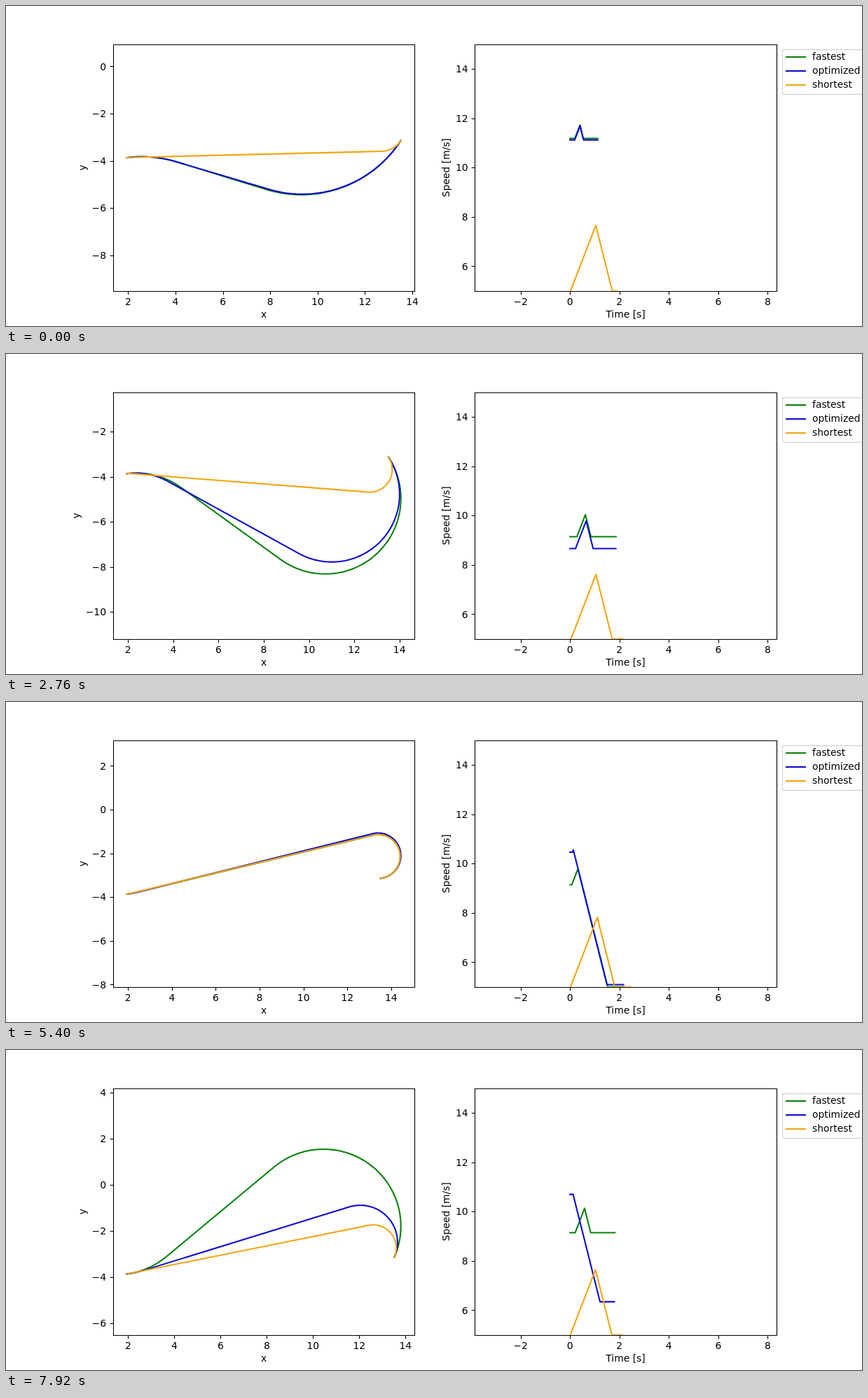
Animation, 1222 px wide and 458 px high, one loop 8 s. Source, as an HTML page:

```html
<!DOCTYPE html>
<html lang="en">
<head>
<meta charset="utf-8">
<title>Path planning</title>
<style>
html, body { margin: 0; width: 1222px; height: 458px; overflow: hidden; background: #fff; }
svg { display: block; }
text { font: 13.89px "DejaVu Sans", sans-serif; fill: #000; }
.axis { fill: none; stroke: #000; stroke-width: 1.11; }
.curve { fill: none; stroke-width: 2.08; stroke-linejoin: round; stroke-linecap: square; }
</style>
</head>
<body>
<svg id="stage" width="1222" height="458" viewBox="0 0 1222 458">
  <defs>
    <clipPath id="leftClip"><rect x="152.75" y="54.96" width="430.5" height="352.66"/></clipPath>
    <clipPath id="rightClip"><rect x="669.3" y="54.96" width="430.5" height="352.66"/></clipPath>
  </defs>
  <g id="plot"></g>
  <g id="fixed"></g>
</svg>
<script>
const STEP = 120, LOOP = 8000, LAST = 66;
const FONT = 13.89;
const TOP = 54.96, HEIGHT = 352.66, BOTTOM = TOP + HEIGHT, WIDTH = 430.5;
const LEFT = 152.75, RIGHT = 669.3;
const TIME_ZERO = 805.2, UNIT = 35.266;
const COLORS = { fastest: "#068206", optimized: "#0a0ad6", shortest: "#f4a40e" };

// Vehicle limits
const LATERAL = 25, ACCEL = 2.6, BRAKE = 4;
const START = { x: 1.94, y: -3.868, h: 0.13 };
const GOAL = { x: 13.517, y: -3.139 };
const GRID = [5, 5 * 5 ** 0.375, 5 * 5 ** 0.5];

// Rows: step, speeds
const WIDE = [[0, 11.12], [10, 10.1], [23, 8.66], [32, 7.7]];
const TIGHT = [[23, 9.7, 5], [32, 10.03, 5.02], [39, 10.35, 5.03], [51, 10.57, 5.15], [66, 10.7, 6.34]];

const TAU = 2 * Math.PI;
const turn = a => ((a % TAU) + TAU) % TAU;
const snap = v => Math.floor(v + 0.5) + 0.5;
const label = n => String(n).replace("-", "\u2212");
const labelWidth = n => [...label(n)].reduce((w, c) => w + (c === "\u2212" ? 0.838 : 0.636), 0) * FONT;

function lookup(rows, k, col) {
  if (k <= rows[0][0]) return rows[0][col];
  for (let i = 1; i < rows.length; i++) {
    const a = rows[i - 1], b = rows[i];
    if (k <= b[0]) return a[col] + (b[col] - a[col]) * (k - a[0]) / (b[0] - a[0]);
  }
  return rows[rows.length - 1][col];
}

const center = (p, h, side, r) => ({ x: p.x - side * r * Math.sin(h), y: p.y + side * r * Math.cos(h) });

// Arc, straight, arc; side is 1 for a left turn and -1 for a right turn.
function route(goalHeading, v1, v2, s1, s2) {
  const r1 = v1 * v1 / LATERAL, r2 = v2 * v2 / LATERAL;
  const c1 = center(START, START.h, s1, r1), c2 = center(GOAL, goalHeading, s2, r2);
  const dx = c2.x - c1.x, dy = c2.y - c1.y, d = Math.hypot(dx, dy);
  const gap = s1 * r1 - s2 * r2;
  if (d < Math.abs(gap)) return null;
  const line = Math.atan2(dy, dx) + Math.asin(gap / d);
  const length = Math.sqrt(d * d - gap * gap);
  const up = 1 / (2 * ACCEL), down = 1 / (2 * BRAKE);
  const peak = Math.sqrt((length + v1 * v1 * up + v2 * v2 * down) / (up + down));
  if (peak < Math.max(v1, v2) - 0.005) return null;
  const a1 = turn(s1 * (line - START.h)), a2 = turn(s2 * (goalHeading - line));
  const t1 = a1 * r1 / v2;
  const t2 = t1 + (peak - v1) / ACCEL;
  const t3 = t2 + (peak - v2) / BRAKE;
  const total = t3 + a2 * r2 / v2;
  return {
    total,
    speed: [[0, v1], [t1, v1], [t2, peak], [t3, v2], [total, v2]],
    arcs: [[c1, START.h, s1, r1, a1], [c2, line, s2, r2, a2]]
  };
}

const quickest = list => list.reduce((a, b) => !a || (b && b.total < a.total) ? b : a, null);

function best(h, v1, v2) {
  return quickest([[-1, 1], [1, -1], [1, 1], [-1, -1]].map(([a, b]) => route(h, v1, v2, a, b)));
}

function tight(h, k) {
  const v2 = lookup(TIGHT, k, 2);
  for (let v1 = lookup(TIGHT, k, 1); v1 > v2; v1 -= 0.01) {
    const r = best(h, v1, v2);
    if (r && r.total < 3) return r;
  }
  return best(h, v2, v2);
}

function plan(k) {
  const h = 1 + 0.05 * k;
  const v = lookup(WIDE, k, 1);
  return {
    fastest: quickest(GRID.flatMap(a => GRID.map(b => best(h, a, b)))),
    optimized: quickest([k < 32 ? best(h, v, v) : null, tight(h, k)]),
    shortest: best(h, 5, 5)
  };
}

function trace(r) {
  const pts = [];
  for (const [c, h, side, radius, sweep] of r.arcs) {
    for (let i = 0; i <= 60; i++) {
      const a = h + side * sweep * i / 60;
      pts.push([c.x + side * radius * Math.sin(a), c.y - side * radius * Math.cos(a)]);
    }
  }
  return pts;
}

const curve = (name, pts) =>
  `<polyline class="curve" stroke="${COLORS[name]}" points="${pts.map(p => p.map(n => n.toFixed(2)).join()).join(" ")}"/>`;
const text = (x, y, s, anchor = "middle", extra = "") =>
  `<text x="${x}" y="${y}" text-anchor="${anchor}" ${extra}>${s}</text>`;
const upright = (x, s) => text(x, 231.3, s, "middle", `transform="rotate(-90 ${x} 231.3)"`);
const frame = x =>
  `<path class="axis" d="M${snap(x)} ${snap(TOP)}H${snap(x + WIDTH)}V${snap(BOTTOM)}H${snap(x)}Z"/>`;
const xTick = (x, n) =>
  `<path class="axis" d="M${snap(x)} ${snap(BOTTOM)}v4.86"/>` + text(x, 428, label(n));
const yTick = (left, y, n) =>
  `<path class="axis" d="M${snap(left)} ${snap(y)}h-4.86"/>` +
  text(left - 9.72, Math.round(y + 5.2), label(n), "end");
const yLabel = (left, widest, s) => upright(Math.round(left - 9.72 - widest - 8.56), s);

// Even numbers in a range, with slack for ticks that fall on its edge.
function evens(lo, hi, slack = 0) {
  const out = [];
  for (let n = 2 * Math.ceil((lo - slack) / 2); n <= hi + slack; n += 2) out.push(n || 0);
  return out;
}

function draw(k) {
  const routes = Object.entries(plan(k));
  const paths = routes.map(([name, r]) => [name, trace(r)]);
  const all = paths.flatMap(p => p[1]);
  const xs = all.map(p => p[0]), ys = all.map(p => p[1]);
  const x0 = Math.min(...xs), x1 = Math.max(...xs);
  const scale = WIDTH / (1.1 * (x1 - x0));
  const midX = (x0 + x1) / 2, midY = (Math.min(...ys) + Math.max(...ys)) / 2;
  const px = x => LEFT + WIDTH / 2 + (x - midX) * scale;
  const py = y => TOP + HEIGHT / 2 - (y - midY) * scale;
  const halfX = WIDTH / 2 / scale, halfY = HEIGHT / 2 / scale, halfPixel = 0.5 / scale;
  const yTicks = evens(midY - halfY, midY + halfY, halfPixel);
  const widest = Math.max(...yTicks.map(labelWidth));

  return `<g clip-path="url(#leftClip)">` +
    paths.map(([name, pts]) => curve(name, pts.map(p => [px(p[0]), py(p[1])]))).join("") +
    `</g><g clip-path="url(#rightClip)">` +
    routes.map(([name, r]) => curve(name, r.speed.map(([t, v]) =>
      [TIME_ZERO + t * UNIT, BOTTOM - (v - 5) * UNIT]))).join("") + `</g>` +
    evens(midX - halfX, midX + halfX, halfPixel).map(n => xTick(px(n), n)).join("") +
    yTicks.map(n => yTick(LEFT, py(n), n)).join("") +
    yLabel(LEFT, widest, "y");
}

function drawFixed() {
  const legend = Object.keys(COLORS).map((name, i) => {
    const y = 73 + 20 * i;
    return curve(name, [[1114, y], [1141, y]]) + text(1151, y + 4, name, "start");
  }).join("");
  return frame(LEFT) + frame(RIGHT) +
    evens(-2, 8).map(n => xTick(TIME_ZERO + n * UNIT, n)).join("") +
    evens(6, 14).map(n => yTick(RIGHT, BOTTOM - (n - 5) * UNIT, n)).join("") +
    text(368, 446, "x") + text(884.5, 446, "Time [s]") +
    yLabel(RIGHT, labelWidth(14), "Speed [m/s]") +
    `<rect x="1108.5" y="62.5" width="116" height="64" rx="2.8" fill="#fff" stroke="#d6d6d6" stroke-width="1.3"/>` +
    legend;
}

const plot = document.getElementById("plot");
document.getElementById("fixed").innerHTML = drawFixed();
const cache = [];
let shown = -1;

function tick() {
  const k = Math.min(LAST, Math.floor((performance.now() - begin) % LOOP / STEP));
  if (k !== shown) {
    plot.innerHTML = cache[k] = cache[k] || draw(k);
    shown = k;
  }
  requestAnimationFrame(tick);
}
const begin = performance.now();
tick();
</script>
</body>
</html>
```
